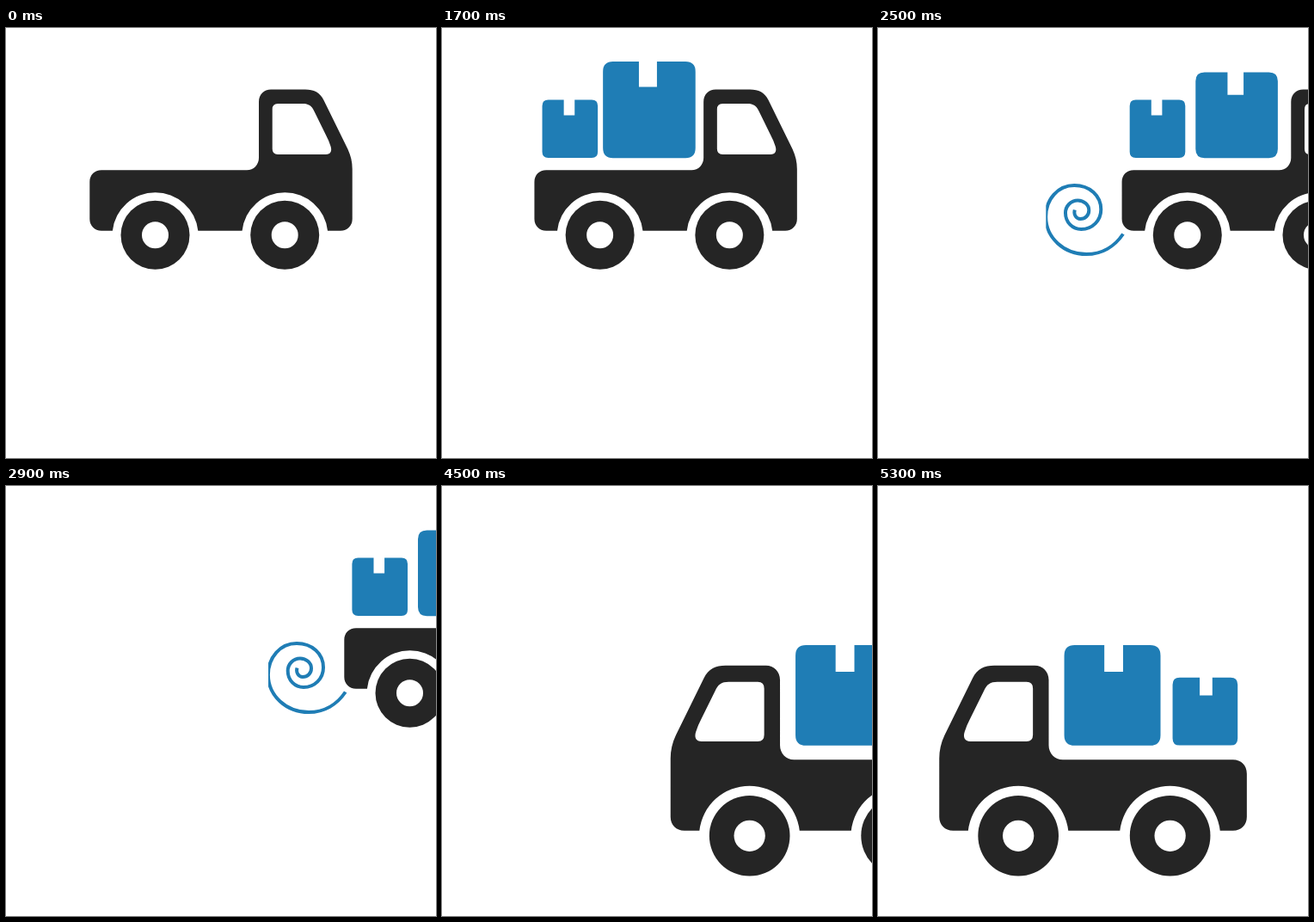
Animation, 500 px wide and 500 px high, one loop 6300 ms. Source, as an HTML page:

```html
<!DOCTYPE html>
<html lang="en">
<head>
<meta charset="utf-8">
<title>Delivery truck</title>
<style>
  html, body { margin: 0; width: 100%; height: 100%; overflow: hidden; background: #fff; }
  svg { display: block; width: 100%; height: 100%; }
</style>
</head>
<body>
<svg viewBox="0 0 500 500">
  <defs>
    <clipPath id="trim"><rect x="9" y="170" width="100" height="110"/></clipPath>

    <!-- Parcel with its origin at the middle of the bottom edge -->
    <path id="parcel" fill="#1f7db5" d="M-25.3-67.4H-7.2V-49.6H5.4V-67.4H25.3
      Q32.3-67.4 32.3-60.4V-7Q32.3 0 25.3 0H-25.3Q-32.3 0-32.3-7V-60.4Q-32.3-67.4-25.3-67.4Z"/>

    <g id="wheel">
      <circle r="40" fill="#252525"/>
      <circle r="15.5" fill="#fff"/>
    </g>

    <g id="truck">
      <path fill="#252525" fill-rule="evenodd" d="M97.3 179C97.3 171 103 165.3 111 165.3H280
        C288 165.3 294 159 294 151V86C294 77.5 300 71.6 308 71.6H348C358 71.6 365 75 369.5 84
        L397.5 141C401 148.5 402.7 156 402.7 164V222C402.7 230 397 235.7 389 235.7H374
        A50 50 0 0 0 274.6 235.7H223.3A50 50 0 0 0 123.9 235.7H111C103 235.7 97.3 230 97.3 222Z
        M316 88Q309.7 88 309.7 94.5V140.5Q309.7 147 316 147H372C377.5 147 379.3 143 377.5 137.5
        Q375.5 131 372 124.5L358.5 97C355.5 90.5 352 88 345 88Z"/>
      <use href="#wheel" x="173.5" y="240.8"/>
      <use href="#wheel" x="324.2" y="240.8"/>
    </g>
  </defs>

  <g id="leaving">
    <use href="#truck"/>
    <use id="small" href="#parcel"/>
    <use id="large" href="#parcel"/>
    <g id="swirl">
      <path fill="none" stroke="#1f7db5" stroke-width="4" d="M98.7 239.5C89 254 74 263 56 263
        C30 263 8.9 244 8.9 219.5C8.9 199 23 183 42 183C60 183 73 195 73 211
        C73 224 63 234 50 234C40 234 31.7 226 31.7 215C31.7 207 38 200.5 46 200.5
        C53 200.5 59 205.5 59 212C59 218 54.5 222 49 222C44 222 41 217 42.5 211.5"/>
    </g>
  </g>

  <g id="arriving">
    <g transform="translate(542.8 124.8) scale(-1.171 1.171)">
      <use href="#truck"/>
      <use href="#parcel" transform="translate(138.7 151)"/>
      <use href="#parcel" transform="translate(230.8 151.2) scale(1.48)"/>
    </g>
  </g>
</svg>
<script>
const LOOP = 6300, STEP = 100, LAST = 5300;
const el = id => document.getElementById(id);

// Each track is a list of [time, value] points joined by straight lines.
const smallScale = [[0, 0], [550, 1.15], [700, 1]];
const largeScale = [[700, 0], [1400, 0.83], [1670, 1.15], [1850, 1]];
const leaveX = [[1650, 0], [2000, 71], [2100, 88], [2800, 260], [2900, 296], [3500, 512]];
const arriveX = [[3700, 417], [4300, 246], [4500, 194.5], [5000, 52], [5200, 0.5], [5300, 0]];

function valueAt(track, t) {
  if (t <= track[0][0]) return track[0][1];
  for (let i = 1; i < track.length; i++) {
    const [t0, v0] = track[i - 1], [t1, v1] = track[i];
    if (t <= t1) return v0 + (v1 - v0) * (t - t0) / (t1 - t0);
  }
  return track[track.length - 1][1];
}

const place = (id, x, y, scale = 1) =>
  el(id).setAttribute("transform", `translate(${x} ${y}) scale(${scale})`);
const show = (id, visible) =>
  el(id).setAttribute("visibility", visible ? "inherit" : "hidden");

function draw(now) {
  const t = Math.min(LAST, Math.floor(now % LOOP / STEP) * STEP);
  place("small", 138.7, 151, valueAt(smallScale, t));
  place("large", 230.8, 151.2, 1.48 * valueAt(largeScale, t));
  place("leaving", valueAt(leaveX, t), 0);
  place("arriving", valueAt(arriveX, t), 0);
  el("swirl").setAttribute("clip-path", t > 2100 ? "url(#trim)" : "none");
  show("swirl", t >= 2000);
  show("leaving", t < 3500);
  show("arriving", t >= 3700);
}

const start = performance.now();
function tick() {
  draw(performance.now() - start);
  requestAnimationFrame(tick);
}
tick();
</script>
</body>
</html>
```
